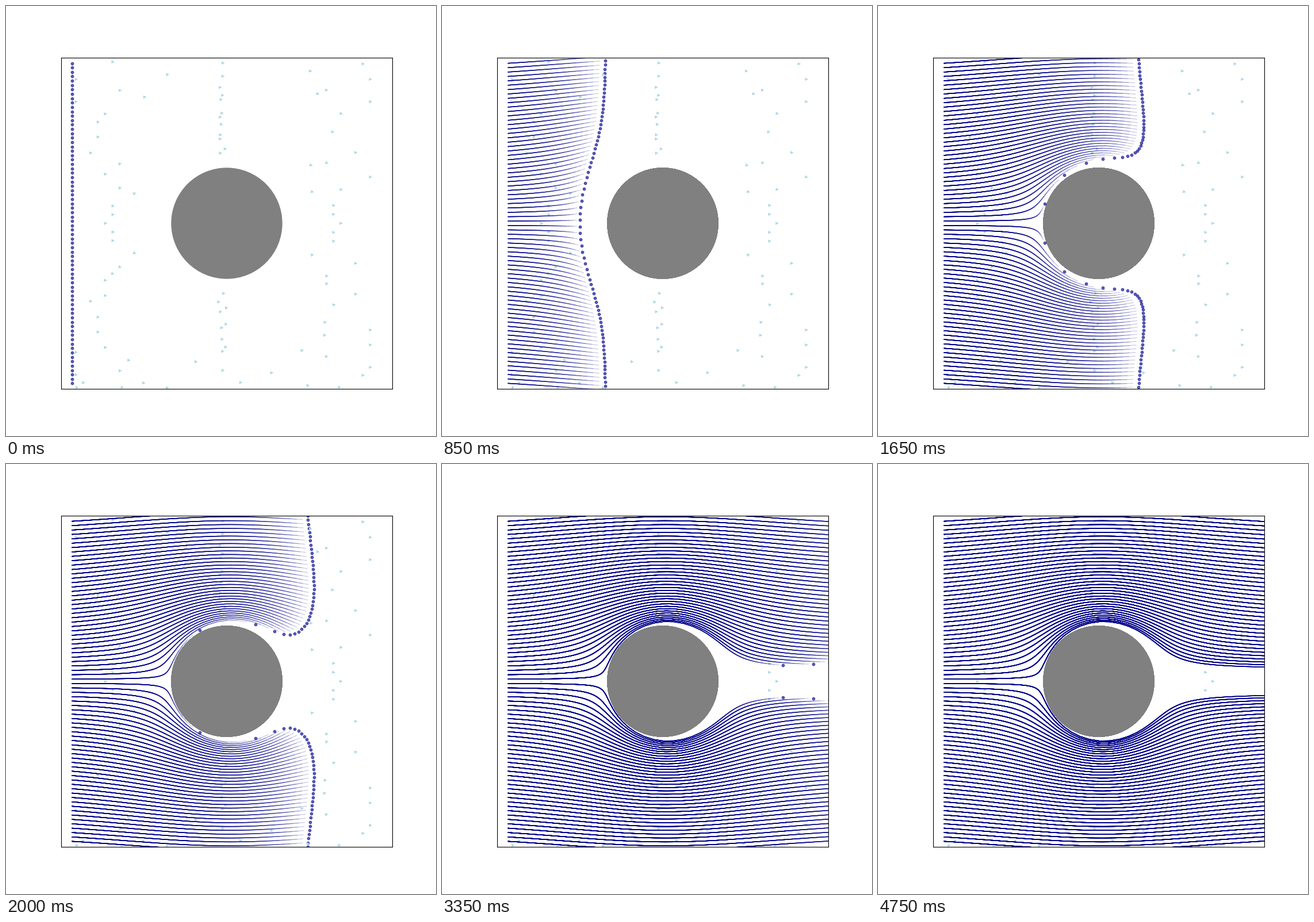
These frames come from a looping animation (748x748 px, 5000 ms). A matplotlib script:

```python
import numpy as np
import matplotlib.pyplot as plt
from matplotlib.animation import FuncAnimation
from matplotlib.collections import LineCollection
from matplotlib.patches import Circle

SIZE, DPI = 748, 100
FRAMES, INTERVAL = 100, 50
DT = 0.1
COUNT = 74                     # particles
FADE = 20                      # steps until a trail is opaque
HALF = 3.0                     # the view spans -HALF..HALF


def velocity(x, y):
    """Potential flow past a unit cylinder."""
    r4 = (x * x + y * y) ** 2
    return 1 - (x * x - y * y) / r4, -2 * x * y / r4


def trace():
    """Euler paths, shaped (particle, step, xy)."""
    x = np.full(COUNT, -2.8)
    y = np.linspace(-2.9, 2.9, COUNT)
    path = [(x, y)]
    for _ in range(FRAMES):
        u, v = velocity(x, y)
        x, y = x + DT * u, y + DT * v
        path.append((x, y))
    return np.array(path).transpose(2, 0, 1)


def draw_arrows(ax):
    """Arrow heads of the flow field, with its lines hidden."""
    axis = np.linspace(-HALF, HALF, 25)
    x, y = np.meshgrid(axis, axis)
    inside = np.hypot(x, y) <= 1
    x[inside] = y[inside] = np.nan
    u, v = velocity(x, y)
    ax.streamplot(axis, axis, u, v, density=1.5, linewidth=0,
                  color="lightblue")


paths = trace()

fig = plt.figure(figsize=(SIZE / DPI, SIZE / DPI), dpi=DPI)
ax = fig.add_axes([96 / SIZE, 82 / SIZE, 576 / SIZE, 576 / SIZE])
draw_arrows(ax)
ax.set(xlim=(-HALF, HALF), ylim=(-HALF, HALF), xticks=[], yticks=[])

# The cylinder is stacked once per step, which hardens its rim
discs = [ax.add_patch(Circle((0, 0), 1, color="gray")) for _ in range(30)]
dots = ax.scatter(*paths[:, 0].T, s=10, color="darkblue", alpha=0.6)


def add_layer(alpha):
    layer = LineCollection([], colors="darkblue", linewidths=1, alpha=alpha,
                           capstyle="projecting", zorder=2)
    return ax.add_collection(layer, autolim=False)


# Opaque layers carry the old part of each trail, faint ones build up the tip
BODY_AGES = [FADE] * 4 + list(range(FADE + 5, FADE + 30, 5))
body = [add_layer(1.0) for _ in BODY_AGES]
tips = [add_layer(0.2) for _ in range(1, FADE)]


def set_span(layer, first, last):
    layer.set_segments(list(paths[:, first:last + 1]) if last > first else [])


def update(n):
    for k, disc in enumerate(discs):
        disc.set_visible(k <= n)
    for layer, age in zip(body, BODY_AGES):
        set_span(layer, 0, n - age)
    split = max(n - FADE, 0)
    for age, layer in enumerate(tips, start=1):
        set_span(layer, split, n - age)
    dots.set_offsets(paths[:, n])
    return [*discs, *body, *tips, dots]


anim = FuncAnimation(fig, update, frames=FRAMES, interval=INTERVAL,
                     repeat=True, repeat_delay=0, cache_frame_data=False)
plt.show()
```
